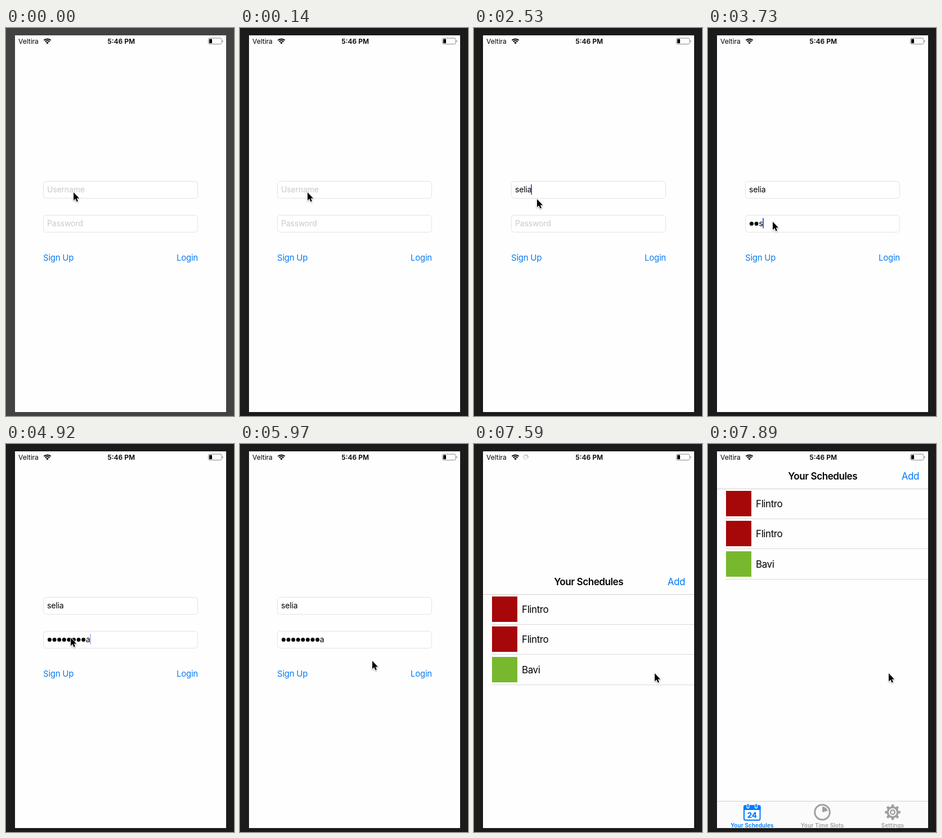
An HTML page for the animation above (8000 ms loop, 405 by 687 pixels).

```html
<!DOCTYPE html>
<html lang="en">
<head>
<meta charset="utf-8">
<title>Login</title>
<style>
  html, body { margin: 0; width: 100%; height: 100%; overflow: hidden; background: #1b1b1b; }
  svg { display: block; font-family: Inter, "Liberation Sans", sans-serif; }
  .status { font-size: 12px; }
  .field { fill: #fff; stroke: #e2e2e2; }
  .input { font-size: 14px; letter-spacing: -.15px; }
  .hint { fill: #c9c9cb; }
  .button { font-size: 15px; letter-spacing: -.24px; fill: #0a7cf0; }
  .row { font-size: 17px; letter-spacing: -.41px; }
  .bold { font-weight: 600; }
  .tab { font-size: 10px; font-weight: 600; letter-spacing: .05px; }
  .rule { stroke: #d9d9db; }
  .blue { fill: #007aff; }
  .gray { fill: #a0a0a0; }
  .mid { text-anchor: middle; }
  .end { text-anchor: end; }
  #pointer { filter: drop-shadow(0 1px 1px rgba(0, 0, 0, .35)); }
</style>
</head>
<body>
<svg width="405" height="687" viewBox="0 0 405 687">
  <defs>
    <clipPath id="screen"><rect x="16" y="13" width="375" height="667"/></clipPath>
  </defs>
  <rect id="desk" width="405" height="687"/>
  <g clip-path="url(#screen)">
    <rect x="16" y="13" width="375" height="667" fill="#fefefe"/>

    <g id="login">
      <rect class="field" x="66.5" y="271.5" width="274" height="30" rx="5"/>
      <rect class="field" x="66.5" y="331.5" width="274" height="30" rx="5"/>
      <text id="userHint" class="input hint" x="73" y="291">Username</text>
      <text id="passHint" class="input hint" x="73" y="351">Password</text>
      <text id="user" class="input" x="73" y="291"></text>
      <g id="dots"></g>
      <text id="lastChar" class="input" y="351"></text>
      <rect id="caret" width="2" height="18" fill="#3f66dd"/>
      <text class="button" x="66" y="412">Sign Up</text>
      <text id="loginButton" class="button end" x="341" y="412">Login</text>
    </g>

    <g id="sheet">
      <rect x="16" y="13" width="375" height="667" fill="#fefefe"/>
      <text class="row bold mid" x="203.7" y="63">Your Schedules</text>
      <text class="row blue end" x="375" y="63">Add</text>
      <path class="rule" d="M16 79.5H391" style="stroke:#cfcfd1"/>
      <g id="rows"></g>

      <rect x="16" y="632" width="375" height="48" fill="#fbfbfb"/>
      <path class="rule" d="M16 632.5H391" style="stroke:#cfcfd1"/>
      <g class="blue">
        <rect x="64" y="640.5" width="28.5" height="25.5" rx="2.5" fill="#fbfbfb" stroke="#007aff" stroke-width="2"/>
        <path d="M63 648V642Q63 639.5 65.500 639.5H91Q93.500 639.5 93.500 642V648Z"/>
        <path d="M71 638.500V643M85.500 638.500V643" stroke="#fbfbfb" stroke-width="5" stroke-linecap="round"/>
        <path d="M71 638.500V642.500M85.500 638.500V642.500" stroke="#007aff" stroke-width="2.600" stroke-linecap="round"/>
        <text class="mid" x="78.200" y="661.500" font-size="13" font-weight="800">24</text>
        <text class="tab mid" x="78.300" y="678.500">Your Schedules</text>
      </g>
      <g class="gray">
        <circle cx="203" cy="652" r="13.300" fill="none" stroke="#a0a0a0" stroke-width="3"/>
        <path d="M203 652V642A10 10 0 0 1 212.700 649.500Z"/>
        <text class="tab mid" x="203" y="678.500">Your Time Slots</text>
      </g>
      <g class="gray">
        <g transform="translate(328 652)">
          <g id="teeth"></g>
          <circle r="10.500"/>
          <circle r="6" fill="none" stroke="#fbfbfb" stroke-width="2"/>
          <circle r="2.600" fill="#fbfbfb"/>
        </g>
        <text class="tab mid" x="328" y="678.500">Settings</text>
      </g>
    </g>

    <g class="status">
      <text x="22" y="27.500">Veltira</text>
      <text class="bold mid" x="204.700" y="27.500">5:46 PM</text>
      <g id="wifi" fill="none" stroke="#000" stroke-width="2"></g>
      <g id="spinner" stroke="#777" stroke-width="1.100"></g>
      <rect x="359.500" y="18" width="23.500" height="10.500" rx="2.500" fill="none" stroke="#8a8a8a"/>
      <rect x="361" y="19.500" width="5" height="7.500" rx=".8"/>
      <path d="M384.300 21.500Q385.800 22 385.800 23.300T384.300 25Z" fill="#8a8a8a"/>
    </g>
  </g>
  <path id="pointer" d="M0 0V14.300L3.300 11.300L5.600 16.600L7.900 15.600L5.700 10.400H10Z"
        stroke="#fff" stroke-width="1.800" paint-order="stroke" stroke-linejoin="round"/>
</svg>
<script>
const LOOP = 8000;
const $ = id => document.getElementById(id);

// Each row is [start ms, value]; a value holds until the next row.
const at = (table, t) => table.reduce((v, row) => row[0] <= t ? row[1] : v, table[0][1]);

const pointer = [
  [0, [120, 291]], [430, [118, 290]], [580, [114, 287]], [730, [110, 285]], [880, [109.5, 284]],
  [2530, [112, 303]], [2680, [113, 326]], [2830, [115, 343]],
  [5820, [146, 351]], [5970, [235, 384]], [6120, [318, 409]], [6270, [338, 412]], [6410, [321, 406]]
];
const userName = [[0, ""], [1630, "s"], [1780, "se"], [1930, "sel"], [2080, "selia"]];
const passCount = [[0, 0], [3580, 1], [3730, 3], [3880, 4], [4030, 6], [4170, 7], [4320, 9]];
const caretAlpha = [
  [0, 0], [430, 1], [730, .4], [880, 0], [1180, .4], [1330, 1],
  [2680, .4], [2830, 0], [3130, 1],
  [4920, .4], [5070, 0], [5370, .4], [5520, 1],
  [5820, .4], [5970, 0], [6270, .4], [6410, 1], [7000, .4], [7150, 0]
];
const sheetTop = [[0, 667], [7440, 450], [7590, 187], [7740, 34], [7890, 0]];
const SECRET = "passworda", DOT = 8.6, LEFT = 73;
const PASS_FOCUS = 2830, MASK_ALL = 6410;

const repeat = (n, make) => Array.from({ length: n }, (_, i) => make(i)).join("");

$("dots").innerHTML = repeat(9, i => `<circle cx="${77.4 + DOT * i}" cy="346.500" r="3.500"/>`);
$("teeth").innerHTML = repeat(8, i =>
  `<path d="M-2.800 -9L-2 -13.800H2L2.800 -9Z" transform="rotate(${45 * i})"/>`);
$("spinner").innerHTML = repeat(8, i =>
  `<path d="M0 -2.300V-5" opacity="${.3 + .1 * i}" transform="rotate(${45 * i})"/>`);

const arc = r => {
  const x = r * Math.sin(.75), y = r * Math.cos(.75);
  return `M${73.5 - x} ${28.4 - y}A${r} ${r} 0 0 1 ${73.5 + x} ${28.4 - y}`;
};
$("wifi").innerHTML = `<path d="${arc(9)}"/><path d="${arc(5.8)}"/>
  <path d="${arc(3.4)}L73.500 28.400Z" fill="#000" stroke="none"/>`;

$("rows").innerHTML = [["Flintro", "#a60708"], ["Flintro", "#a60708"], ["Bavi", "#77b82e"]]
  .map(([name, color], i) => {
    const y = Math.round(83 + 53.4 * i);
    return `<rect x="32" y="${y}" width="45" height="45" fill="${color}"/>
      <text class="row" x="85" y="${y + 28.5}">${name}</text>
      <path class="rule" d="M31 ${y + 49.5}H391"/>`;
  }).join("");

const dots = [...$("dots").children];
const show = (node, on) => node.setAttribute("visibility", on ? "visible" : "hidden");

function draw(t) {
  const name = at(userName, t), count = at(passCount, t);
  const masked = t >= MASK_ALL ? count : Math.max(0, count - 1);
  const inPass = t >= PASS_FOCUS;

  $("desk").setAttribute("fill", t < 140 ? "#424242" : "#1b1b1b");
  $("user").textContent = name;
  show($("userHint"), !name);
  show($("passHint"), !count);
  dots.forEach((dot, i) => show(dot, i < masked));

  const last = $("lastChar");
  last.textContent = SECRET.slice(masked, count);
  last.setAttribute("x", LEFT + DOT * masked);

  const typed = inPass
    ? DOT * masked + (masked < count ? last.getComputedTextLength() : 0)
    : name ? $("user").getComputedTextLength() : 0;
  const caret = $("caret");
  caret.setAttribute("x", Math.floor(LEFT + typed - (name && !inPass ? .8 : 0)));
  caret.setAttribute("y", inPass ? 336.5 : 277);
  caret.setAttribute("opacity", at(caretAlpha, t));

  $("loginButton").setAttribute("opacity", t >= 6710 && t < 6860 ? .25 : 1);
  const top = at(sheetTop, t);
  show($("sheet"), top < 667);
  $("sheet").setAttribute("transform", `translate(0 ${top})`);

  show($("spinner"), t >= 7000 && t < 7740);
  const turn = Math.floor((t - 7000) / 148) * 45;
  $("spinner").setAttribute("transform", `translate(92 23) rotate(${turn})`);
  $("pointer").setAttribute("transform", `translate(${at(pointer, t)})`);
}

const start = performance.now();
function tick() {
  draw((performance.now() - start) % LOOP);
  requestAnimationFrame(tick);
}
tick();
</script>
</body>
</html>
```
